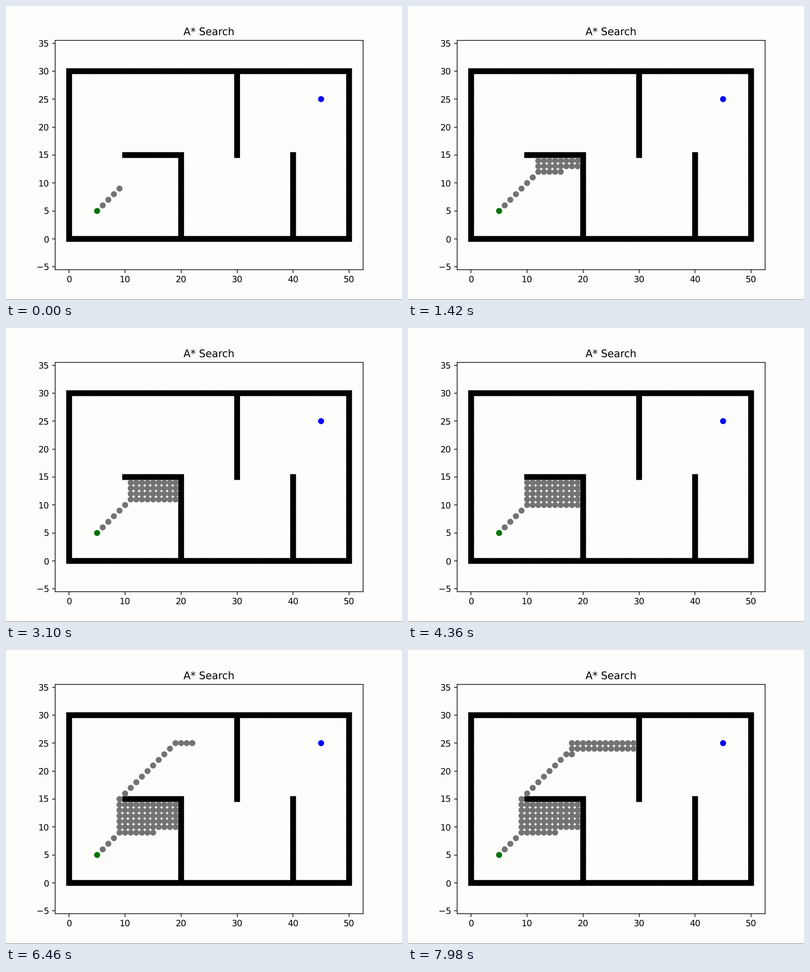
Animation of 868 by 645 pixels, one loop 8 s. Source, as a matplotlib script:

```python
import math

import matplotlib.pyplot as plt
from matplotlib.animation import FuncAnimation
from matplotlib.collections import PatchCollection
from matplotlib.patches import Circle, Rectangle

W, H, DPI = 868, 645, 128
STEP, LOOP = 20, 8000
ZOOM = 1.0625          # all default sizes, slightly enlarged
START, GOAL = (5, 5), (45, 25)
SHOWN_AT_START = 4
RADIUS, BLOCK = 0.538, 1.04      # dot and wall sizes in grid cells
PAPER = "#fdfdfb"
MOVES = [(1, 0), (0, 1), (-1, 0), (0, -1), (1, 1), (-1, 1), (1, -1), (-1, -1)]

plt.rcParams.update({
    "font.family": "DejaVu Sans",
    "font.size": 10 * ZOOM,
    "text.hinting": "none",
    "axes.titlesize": 12 * ZOOM,
    "axes.titlepad": 6 * ZOOM,
    "axes.linewidth": 0.8 * ZOOM,
})
for axis in ("xtick", "ytick"):
    plt.rcParams.update({
        axis + ".major.size": 3.5 * ZOOM,
        axis + ".major.width": 0.8 * ZOOM,
        axis + ".major.pad": 3.5 * ZOOM,
    })


def build_walls():
    walls = {(x, y) for x in range(51) for y in (0, 30)}
    walls |= {(x, y) for x in (0, 50) for y in range(31)}
    walls |= {(x, 15) for x in range(10, 21)}
    walls |= {(20, y) for y in range(15)}
    walls |= {(30, y) for y in range(15, 30)}
    walls |= {(40, y) for y in range(16)}
    return walls


def search(walls, limit):
    """A* with Manhattan heuristic; returns cells in the order they are popped."""
    cost = {START: 0.0}
    queue = [(0.0, 0, START)]
    pushed = 0
    popped = []
    while queue and len(popped) < limit:
        best = min(queue)
        queue.remove(best)
        cell = best[2]
        popped.append(cell)
        for dx, dy in MOVES:
            near = (cell[0] + dx, cell[1] + dy)
            if near in walls:
                continue
            g = cost[cell] + math.hypot(dx, dy)
            if g < cost.get(near, math.inf) - 1e-9:
                cost[near] = g
                h = abs(GOAL[0] - near[0]) + abs(GOAL[1] - near[1])
                pushed += 1
                queue.append((round(g + h, 6), pushed, near))
    return popped


def pops_at(ms):
    """Each pop takes a little longer than the one before."""
    n = 0
    while (n + 1) * (60 + 0.075 * (n + 1)) <= ms:
        n += 1
    return n


def block(cell):
    return Rectangle((cell[0] - BLOCK / 2, cell[1] - BLOCK / 2), BLOCK, BLOCK)


def dot(cell):
    return Circle(cell, RADIUS)


def add_shapes(ax, shapes, color):
    group = PatchCollection(shapes, facecolor=color, linewidth=0, snap=False)
    return ax.add_collection(group, autolim=False)


walls = build_walls()
dots = [dot(cell) for cell in search(walls, 130)[1:]]

fig = plt.figure(figsize=(W / DPI, H / DPI), dpi=DPI, facecolor=PAPER)
left, right, top, bottom = 107.7, 782.7, 75.5, 578.5
ax = fig.add_axes([left / W, 1 - bottom / H, (right - left) / W, (bottom - top) / H],
                  facecolor=PAPER)
ax.set_xlim(-2.5, 52.5)
ax.set_ylim(-5.5, 35.5)
ax.set_xticks(range(0, 51, 10))
ax.set_yticks(range(-5, 36, 5))
ax.set_title("A* Search")
for spine in ax.spines.values():
    spine.set_snap(False)
fig.add_artist(Rectangle((0, 0), 1, 1 / H, transform=fig.transFigure,
                         facecolor="#80806e", linewidth=0))

add_shapes(ax, [block(cell) for cell in sorted(walls)], "black")
add_shapes(ax, [dot(START)], "#007400")
add_shapes(ax, [dot(GOAL)], "#0000fa")
trail = add_shapes(ax, dots[:SHOWN_AT_START], "#737373")


def update(i):
    trail.set_paths(dots[:SHOWN_AT_START + pops_at(i * STEP)])
    return trail,


anim = FuncAnimation(fig, update, frames=LOOP // STEP, interval=STEP,
                     init_func=lambda: update(0), repeat=True, repeat_delay=0)
plt.show()
```
